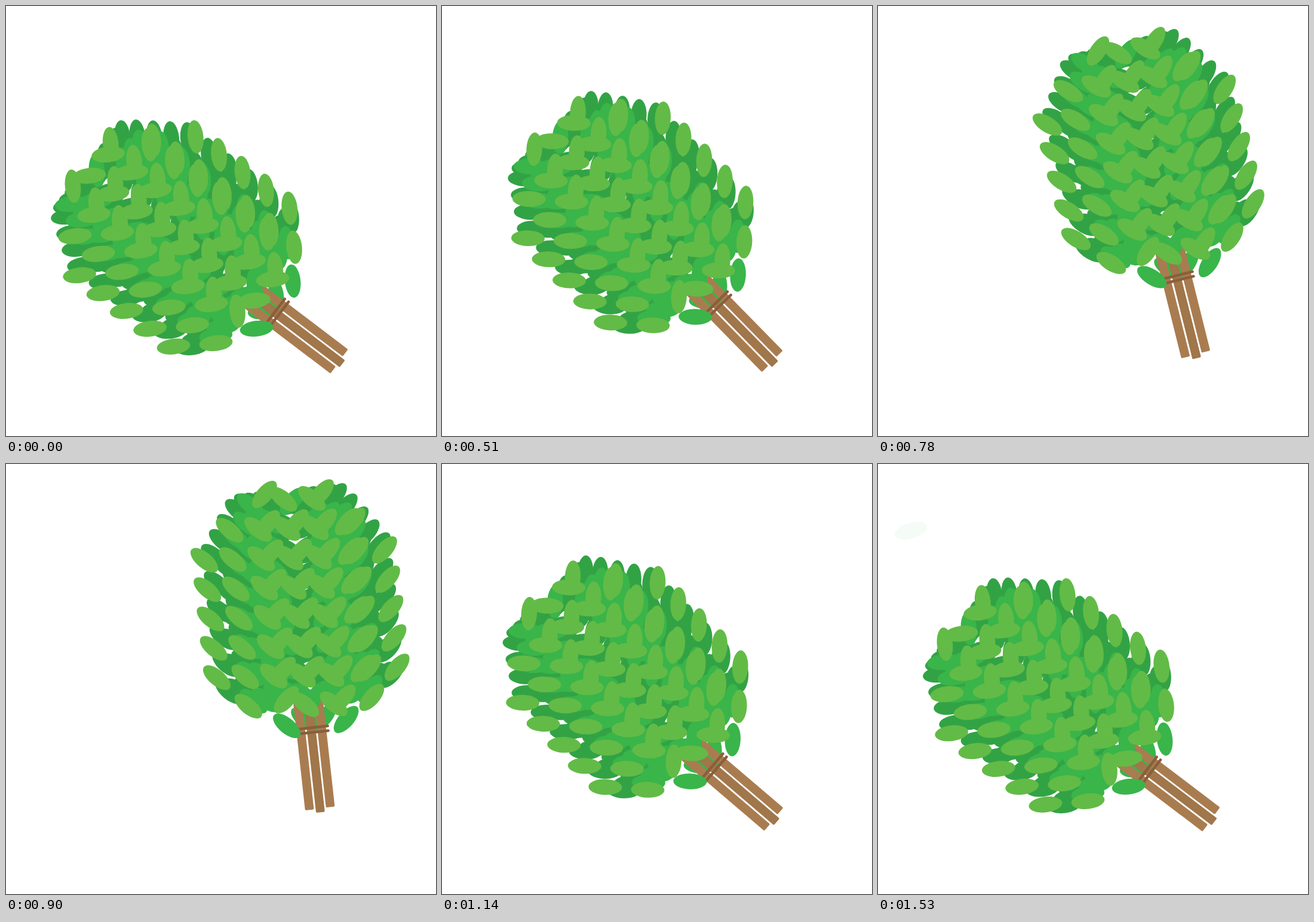
Write an HTML page that moves like this. It is 720 px wide and 720 px high and loops after 1.92 s.

```html
<!DOCTYPE html>
<html lang="en">
<head>
<meta charset="utf-8">
<title>Leafy broom</title>
<style>
  html, body { margin: 0; width: 100%; height: 100%; overflow: hidden; background: #fff; }
  svg { display: block; width: 100vw; height: 100vh; }
  .dark { fill: #32a345; }
  .mid { fill: #39b54a; }
  .light { fill: #62bb46; }
  .twig { fill: #a97c50; }
  .core { fill: #a0764a; }
  .twine { stroke: #8b5e3c; stroke-width: 4.6; stroke-linecap: round; }
</style>
</head>
<body>
<svg viewBox="0 0 720 720">
  <g id="loose" class="mid"></g>
  <g id="broom">
    <g class="crown" id="under"></g>
    <g id="handle"></g>
    <g class="crown" id="over"></g>
  </g>
</svg>
<script>
const LOOP = 1920, STEP = 30, REST = 1530, HIT = 1160, PITCH = 49.4;
const SIDES = [1, -1];
const $ = id => document.getElementById(id);
const times = (n, make) => Array.from({ length: n }, (_, i) => make(i)).join('');
const both = make => SIDES.map(make).join('');
const layer = (tone, shapes) => `<g class="${tone}">${shapes}</g>`;

// Leaves on the right lean right, those on the left lean left.
const leaf = (x, y, tilt) =>
  `<ellipse rx="13.2" ry="28" transform="translate(${x} ${y}) rotate(${tilt})"/>`;
const sideLeaf = (side, x, y) => leaf(x, y, 1.5 + side * 45.5);
const pair = (x, gap, y) => both(s => sideLeaf(s, x + s * gap, y));
const column = (side, x, y, n, pitch = PITCH) => times(n, i => sideLeaf(side, x, y - i * pitch));

// Outline of the crown: flat top with sloping shoulders, bottom rising to the stem.
const topEdge = x => -188 + 1.47 * Math.max(0, Math.abs(x) - 80);
const bottomEdge = x => Math.min(118, 100 + Math.abs(x) / 4);

// Columns from the rim inwards, each filled evenly between the edges.
const fill = (rim, gap, n, inset, drop) => both(s => times(n, i => {
  const x = 4 + s * (rim - gap * i);
  const top = topEdge(x) + inset, bottom = bottomEdge(x) + drop;
  const rows = Math.ceil((bottom - top) / 46);
  return column(s, x, bottom, rows + 1, (bottom - top) / rows);
}));

// Front columns: rows per column, and how many rows it hangs below the base line.
const front = (side, rows, hang) => times(rows.length, i => column(
  side, side * (151 - 47.5 * i), 99.7 + side * (7.3 - 3.7 * i) + hang[i] * PITCH, rows[i]));

const stick = (x, top, end, tone) =>
  `<rect class="${tone}" x="${x - 7.4}" y="${top}" width="14.8" height="${end - top}" rx="2"/>`;
const cord = y => `<path class="twine" d="M-29 ${y}H25"/>`;

$('under').innerHTML = layer('mid', pair(4, 16, 178));
$('handle').innerHTML = stick(14.5, 128, 328, 'twig') + stick(-20.7, 140, 329, 'twig') +
  stick(-3, 138, 335, 'core') + cord(192.5) + cord(200.5);
$('over').innerHTML =
  layer('dark', fill(137, 16, 9, 0, 0)) +
  layer('mid', fill(98, 20, 4, 30, 20) + pair(-29, 35, -188) + pair(3, 10, 138) + pair(7, 50, 185)) +
  layer('light', column(1, 94, 103, 6) +
    front(1, [5, 7, 8, 6, 8], [0, 1, 1, 0, 1]) +
    front(-1, [5, 7, 6, 8, 8], [0, 1, 0, 1, 1]));

// Smooth curve through keys, flat at peaks and rests.
function track(keys) {
  const slope = i => {
    const a = keys[i - 1], k = keys[i], b = keys[i + 1];
    if (!a || !b || (k[1] - a[1]) * (b[1] - k[1]) <= 0) return 0;
    return (b[1] - a[1]) / (b[0] - a[0]);
  };
  return t => {
    if (t <= keys[0][0]) return keys[0][1];
    const i = keys.findIndex(k => k[0] > t) - 1;
    if (i < 0) return keys[keys.length - 1][1];
    const [t0, a] = keys[i], [t1, b] = keys[i + 1];
    const d = t1 - t0, x = (t - t0) / d, r = 1 - x;
    return a + (b - a) * x * x * (3 - 2 * x) +
      d * x * r * (slope(i) * r - slope(i + 1) * x);
  };
}

const swing = track([[375, 0], [630, 21.3], [780, 38.8], [900, 46.5], [1000, 49.3],
  [1020, 49.1], [1140, 3.3], [1170, 0]]);
const lag = track([[880, 0], [1020, 5.2], [1080, 5.6], [1140, 5.1], [1260, -6], [1400, 0]]);
const shiftX = track([[375, 0], [630, 2.7], [1020, -2.4], [1140, 0]]);
const shiftY = track([[375, 0], [630, 1.1], [1020, -4.6], [1140, 0]]);

// Leaves shaken off by the hit rise to an arc above the crown and fade.
$('loose').innerHTML = times(4, () => leaf(0, 0, 0));
const loose = [...$('loose').children];

function drawLoose(t) {
  const age = Math.max(0, t - HIT);
  const p = 1 - Math.pow(1 - age / (REST - HIT), 1.5);
  loose.forEach((el, i) => {
    const endX = 55 + 150 * i, endY = 45 + (endX - 290) ** 2 / 830;
    const x = 185 + 65 * i, y = 225 + 10 * i;
    el.setAttribute('transform', `translate(${x + (endX - x) * p} ${y + (endY - y) * p}) ` +
      `rotate(${74 - 40 * i - 60 * (1 - p)})`);
    el.setAttribute('opacity', age ? Math.max(0, 1 - age / (390 - 25 * i)) : 0);
  });
}

const crowns = document.querySelectorAll('.crown');

function draw(t) {
  $('broom').setAttribute('transform',
    `translate(${shiftX(t)} ${shiftY(t)}) rotate(${swing(t)} 560 551.5) ` +
    'translate(298.2 394.1) rotate(-52.8)');
  crowns.forEach(c => c.setAttribute('transform', `rotate(${lag(t)} 4.6 151)`));
  drawLoose(t);
}

const start = performance.now();
function tick() {
  const t = (performance.now() - start) % LOOP;
  draw(Math.min(REST, Math.floor(t / STEP) * STEP));
  requestAnimationFrame(tick);
}
tick();
</script>
</body>
</html>
```
